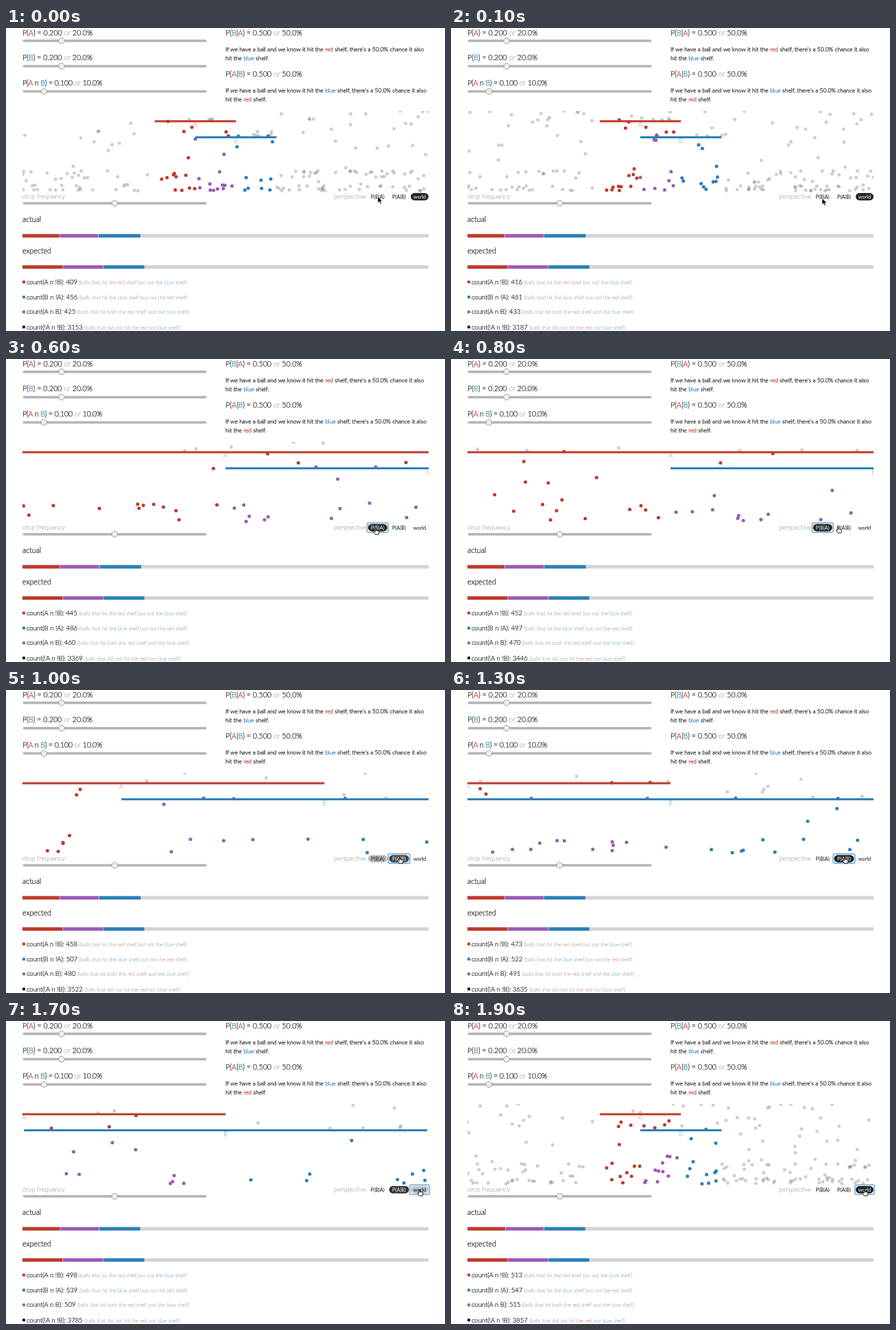
Recreate the animation shown at these times as an HTML page with a canvas. Size 640 by 442 pixels, loop 2 s.

```html
<!DOCTYPE html>
<html lang="en">
<head>
<meta charset="utf-8">
<title>Conditional probability</title>
<style>
  html, body { margin: 0; width: 100%; height: 100%; overflow: hidden; background: #fff; }
  canvas { position: absolute; left: 24px; top: 120.5px; width: 592px; height: 120px; }
  svg { display: block; }
  #page { position: absolute; left: 0; top: 0; }
  text { font: 300 10.65px Lato, sans-serif; fill: #222; stroke: #222; stroke-width: .22; white-space: pre; }
  .body { font-size: 8.5px; stroke-width: .26; }
  .tight { letter-spacing: -.17px; }
  .mid, .mid text { font-size: 9.45px; }
  .r { fill: #c0392b; }
  .b { fill: #2980b9; }
  .p { fill: #9b59b6; }
  tspan.r { stroke: #c0392b; }
  tspan.b { stroke: #2980b9; }
  .dim { fill: #aaa; stroke: #aaa; stroke-width: .12; }
  .note { font-size: 7.5px; }
  .note .r { fill: #d9918a; stroke: #d9918a; }
  .note .b { fill: #8ab8da; stroke: #8ab8da; }
  .button text { font-size: 7.4px; font-weight: 400; text-anchor: middle; stroke: none; }
  .track { fill: #bbb; stroke: #999; stroke-width: .7; }
  .thumb { fill: #eee; stroke: #8f8f8f; stroke-width: .8; }
  .label { font-size: 9.6px; text-anchor: middle; stroke: none; opacity: .7; }
  .ring { fill: none; stroke: #7fb3e6; stroke-width: 1.8; }
  .cursor { fill: #fff; stroke: #000; stroke-width: .9; stroke-linejoin: round; }
  #arrow { fill: #000; stroke: #fff; stroke-width: .6; }
</style>
</head>
<body>
<canvas id="balls"></canvas>
<svg id="page" width="640" height="442" viewBox="0 0 640 442">
  <text x="24" y="10.5">P(<tspan class="r">A</tspan>) = 0.200 <tspan class="dim">or</tspan> 20.0%</text>
  <text x="24" y="47.2">P(<tspan class="b">B</tspan>) = 0.200 <tspan class="dim">or</tspan> 20.0%</text>
  <text class="tight" x="24" y="84.2">P(<tspan class="r">A</tspan> n <tspan class="b">B</tspan>) = 0.100 <tspan class="dim">or</tspan> 10.0%</text>

  <text x="320" y="10.5">P(<tspan class="b">B</tspan>|<tspan class="r">A</tspan>) = 0.500 <tspan class="dim">or</tspan> 50.0%</text>
  <text class="body" x="320" y="33.8">If we have a ball and we know it hit the <tspan class="r">red</tspan> shelf, there's a 50.0% chance it also</text>
  <text class="body" x="320" y="46.8">hit the <tspan class="b">blue</tspan> shelf.</text>
  <text x="320" y="71.2">P(<tspan class="r">A</tspan>|<tspan class="b">B</tspan>) = 0.500 <tspan class="dim">or</tspan> 50.0%</text>
  <text class="body" x="320" y="94.2">If we have a ball and we know it hit the <tspan class="b">blue</tspan> shelf, there's a 50.0% chance it also</text>
  <text class="body" x="320" y="107.2">hit the <tspan class="r">red</tspan> shelf.</text>

  <g id="sliders"></g>
  <text class="mid dim" x="24" y="248.5">drop frequency</text>
  <text class="mid dim" x="478" y="248.5">perspective</text>

  <svg x="24" y="120.5" width="592" height="120" viewBox="24 120.5 592 120">
    <g id="shelves"></g>
  </svg>

  <text x="24" y="283.4">actual</text>
  <text x="24" y="329">expected</text>
  <g id="bars"></g>

  <g class="mid">
    <rect class="r" x="24" y="368.5" width="4" height="4"/>
    <text x="30" y="373.7">count(A n !B): <tspan class="count"></tspan> <tspan class="note dim">(balls that hit the <tspan class="r">red</tspan> shelf but not the <tspan class="b">blue</tspan> shelf)</tspan></text>
    <rect class="b" x="24" y="390.5" width="4" height="4"/>
    <text x="30" y="395.7">count(B n !A): <tspan class="count"></tspan> <tspan class="note dim">(balls that hit the <tspan class="b">blue</tspan> shelf but not the <tspan class="r">red</tspan> shelf)</tspan></text>
    <rect class="p" x="24" y="412.2" width="4" height="4"/>
    <text x="30" y="417.4">count(A n B): <tspan class="count"></tspan> <tspan class="note dim">(balls that hit both the <tspan class="r">red</tspan> shelf and the <tspan class="b">blue</tspan> shelf)</tspan></text>
    <rect fill="#222" x="24" y="434.2" width="4" height="4"/>
    <text x="30" y="439.5">count(!A n !B): <tspan class="count"></tspan> <tspan class="note dim">(balls that did not hit the <tspan class="r">red</tspan> nor <tspan class="b">blue</tspan> shelf)</tspan></text>
  </g>

  <g id="buttons" class="button"></g>
  <path id="arrow" d="M0 0V9.2L2.2 7.2L3.8 10.7L5.4 10L3.9 6.6H6.8Z"/>
  <path id="hand" class="cursor" d="M-1.8 1V-3.8Q-1.1 -5.2 -.4 -3.8V-.9L2.6 -.3Q4.3 0 4 1.8L3.2 5H-1.4L-4 1.3Q-3.9 .1 -2.7 .5Z"/>
</svg>
<script>
const LOOP = 2000, STEP = 100;
const LEFT = 24, WIDTH = 592;
const RED = '#c0392b', BLUE = '#2980b9', PURPLE = '#9b59b6', GRAY = 'rgba(0,0,0,.19)';
const START_Y = 120.5, FLOOR_Y = 237, FALL_MS = 340;
const shelfA = { name: 'A', x: 216.8, y: 136, w: 118.4, cls: 'r' };
const shelfB = { name: 'B', x: 276, y: 159.4, w: 118.4, cls: 'b' };

const $ = id => document.getElementById(id);
const clamp = v => Math.max(0, Math.min(1, v));
const mix = (a, b, p) => a + (b - a) * p;
const cubicInOut = p => p < .5 ? 4 * p ** 3 : 1 - 4 * (1 - p) ** 3;
const smooth = p => p * p * (3 - 2 * p);

function add(parent, tag, attrs, text) {
  const el = document.createElementNS('http://www.w3.org/2000/svg', tag);
  set(el, attrs);
  if (text) el.textContent = text;
  return parent.appendChild(el);
}
function set(el, attrs) {
  for (const key in attrs) el.setAttribute(key, attrs[key]);
}

// Static controls
for (const [x, y] of [[81, 18.7], [81, 55.7], [55.3, 92.5], [158.5, 255.7]]) {
  add($('sliders'), 'rect', { class: 'track', x: LEFT + 1, y: y - 1.3, width: 267, height: 2.6, rx: 1.3 });
  add($('sliders'), 'circle', { class: 'thumb', cx: x, cy: y, r: 4.3 });
}

function makeBar(y) {
  add($('bars'), 'rect', { x: LEFT, y, width: WIDTH, height: 5, fill: '#d3d3d3' });
  const parts = [RED, PURPLE, BLUE].map(fill => add($('bars'), 'rect', { y, height: 5, fill }));
  return shares => {
    let x = LEFT;
    shares.forEach((share, i) => {
      const w = share * WIDTH;
      set(parts[i], { x, width: w - (i < 2 ? .8 : 0) });
      x += w;
    });
  };
}
const setActual = makeBar(300.6);
makeBar(346.2)([.1, .1, .1]);

const shelves = [shelfA, shelfB].map(shelf => ({
  ...shelf,
  bar: add($('shelves'), 'rect', { class: shelf.cls, y: shelf.y - 1.5, height: 3 }),
  label: add($('shelves'), 'text', { class: 'label ' + shelf.cls, y: shelf.y + 8.3 }, shelf.name)
}));

const buttons = [['P(B|A)', 541.8, 28], ['P(A|B)', 573, 29], ['world', 603, 26]].map(([name, x, w]) => ({
  pill: add($('buttons'), 'rect', { x: x - w / 2, y: 240.8, width: w, height: 10.6, rx: 5.3, fill: '#222' }),
  ring: add($('buttons'), 'rect', { class: 'ring', x: x - w / 2 - 1.3, y: 239.2, width: w + 2.6, height: 13.6, rx: 2 }),
  text: add($('buttons'), 'text', { x, y: 248.6 }, name)
}));

// Perspectives: screen x = x * k + o
const zoomTo = shelf => ({ k: 5, o: LEFT - 5 * shelf.x });
const views = [zoomTo(shelfA), zoomTo(shelfB), { k: 1, o: 0 }];
const clicks = [{ at: 350, view: 0 }, { at: 884, view: 1 }, { at: 1670, view: 2 }];
const ZOOM_MS = 230, FADE_MS = 180;

function perspective(t) {
  let from = 2, to = 2, since = Infinity;
  for (const { at, view } of clicks) {
    if (t >= at) [from, to, since] = [to, view, t - at];
  }
  const p = cubicInOut(clamp(since / ZOOM_MS));
  const fade = clamp(since / FADE_MS);
  return {
    from, to,
    focused: since < Infinity,
    fadeIn: Math.sin(fade * Math.PI / 2),
    fadeOut: 1 - smooth(fade),
    k: mix(views[from].k, views[to].k, p),
    o: mix(views[from].o, views[to].o, p)
  };
}

// time, A only, B only, both, neither
const tallies = [
  [0, 409, 456, 425, 3153], [300, 429, 470, 448, 3254], [600, 445, 486, 460, 3369],
  [1000, 458, 507, 480, 3522], [1300, 473, 522, 491, 3635], [1700, 498, 539, 509, 3785],
  [1900, 513, 547, 515, 3857]
];
const countEls = document.querySelectorAll('.count');

function between(rows, t) {
  const i = Math.max(1, rows.findIndex(row => row[0] >= t));
  const [a, b] = [rows[i - 1], rows[i]];
  const p = clamp((t - a[0]) / (b[0] - a[0]));
  return a.slice(1).map((v, j) => mix(v, b[j + 1], p));
}

// Falling balls
let seed = 7;
function random() {
  seed = (seed * 16807) % 2147483647;
  return seed / 2147483647;
}
const hits = (shelf, x) => x >= shelf.x && x <= shelf.x + shelf.w;

const balls = Array.from({ length: 1060 }, () => {
  const x = LEFT + random() * WIDTH;
  const onA = hits(shelfA, x), onB = hits(shelfB, x);
  const legs = [];
  let y = START_Y, color = GRAY;
  const fall = (to, next) => {
    legs.push({ from: y, to, color, ms: FALL_MS * (to - y) / (FLOOR_Y - START_Y) });
    y = to;
    color = next;
  };
  if (onA) fall(shelfA.y - 2.5, RED);
  if (onB) fall(shelfB.y - 2.5, onA ? PURPLE : BLUE);
  fall(FLOOR_Y, color);
  return { x, legs, born: random() * LOOP };
});

function bounce(p) {
  const n = 7.5625, d = 2.75;
  if (p < 1 / d) return n * p * p;
  if (p < 2 / d) return n * (p - 1.5 / d) ** 2 + .75;
  if (p < 2.5 / d) return n * (p - 2.25 / d) ** 2 + .9375;
  return n * (p - 2.625 / d) ** 2 + .984375;
}

const canvas = $('balls'), ctx = canvas.getContext('2d');
const ratio = window.devicePixelRatio || 1;
canvas.width = WIDTH * ratio;
canvas.height = 120 * ratio;

function drawBalls(t, { k, o }) {
  ctx.setTransform(ratio, 0, 0, ratio, -LEFT * ratio, -START_Y * ratio);
  ctx.clearRect(LEFT, START_Y, WIDTH, 120);
  for (const { x, legs, born } of balls) {
    let age = (t - born + LOOP) % LOOP;
    if (age > FALL_MS) continue;
    const leg = legs.find(l => age <= l.ms || (age -= l.ms, false));
    if (!leg) continue;
    ctx.fillStyle = leg.color;
    ctx.beginPath();
    ctx.arc(x * k + o, mix(leg.from, leg.to, bounce(age / leg.ms)), 2.5, 0, 2 * Math.PI);
    ctx.fill();
  }
}

// time, x, y
const pointerPath = [
  [0, 542, 246], [200, 540, 251], [640, 540, 251], [860, 575, 248],
  [1380, 575, 248], [1620, 604, 250], [2000, 604, 250]
];

function draw(t) {
  const view = perspective(t);
  drawBalls(t, view);

  for (const { x, w, bar, label } of shelves) {
    set(bar, { x: x * view.k + view.o, width: w * view.k });
    set(label, { x: (x + w / 2) * view.k + view.o });
  }

  buttons.forEach(({ pill, ring, text }, i) => {
    const level = i === view.to ? view.fadeIn : i === view.from ? view.fadeOut : 0;
    set(pill, { opacity: level });
    set(ring, { opacity: view.focused && i === view.to ? 1 : 0 });
    text.style.fill = level > .5 ? '#fff' : '#111';
  });

  const counts = between(tallies, t);
  countEls.forEach((el, i) => { el.textContent = Math.round(counts[i]); });
  const total = counts.reduce((a, b) => a + b);
  setActual([counts[0], counts[2], counts[1]].map(c => c / total));

  const [px, py] = between(pointerPath, t);
  const transform = `translate(${px} ${py})`;
  const overButton = t >= 200;
  set($('arrow'), { transform, visibility: overButton ? 'hidden' : 'visible' });
  set($('hand'), { transform, visibility: overButton ? 'visible' : 'hidden' });
}

const begin = performance.now();
function tick() {
  const t = (performance.now() - begin) % LOOP;
  draw(Math.floor(t / STEP) * STEP);
  requestAnimationFrame(tick);
}
tick();
</script>
</body>
</html>
```
